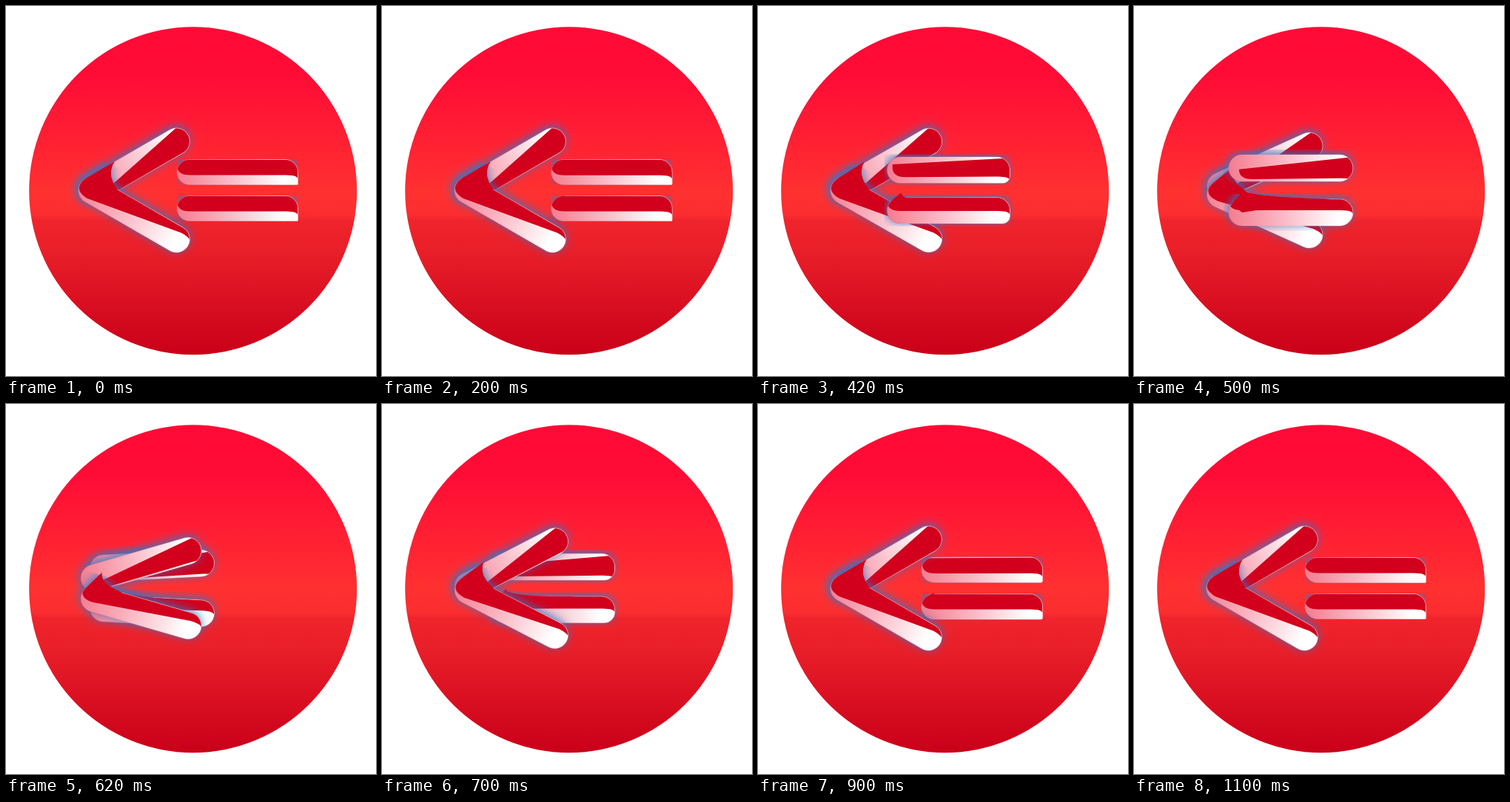
Write an HTML page with a canvas that moves like this. It is 500x500 px and loops after 1180 ms.

```html
<!DOCTYPE html>
<html>
<head>
<meta charset="utf-8">
<style>
html, body { margin: 0; width: 100%; height: 100%; overflow: hidden; background: #fff; }
canvas { display: block; }
</style>
</head>
<body>
<canvas id="stage" width="500" height="500"></canvas>
<script>
const ctx = document.getElementById('stage').getContext('2d');
const LOOP = 1180, START = 100, END = 1070, STEP = 20;
const MID_Y = 249, DARK = '#d2001c';
const SLIDE_END = .28, TURN_END = .89;

const clamp = x => Math.max(0, Math.min(1, x));
const ease = x => x < .5 ? 4 * x ** 3 : 1 - 4 * (1 - x) ** 3;
const smooth = x => x * x * (3 - 2 * x);

function gradient(x0, y0, x1, y1, stops) {
  const g = ctx.createLinearGradient(x0, y0, x1, y1);
  for (const [at, colour] of stops) g.addColorStop(at, colour);
  return g;
}

// A bar first slides left (j), then turns into an arm of the arrow head (k).
// side is -1 for the upper piece, 1 for the lower one.
function makePiece(s, side) {
  const j = clamp(s / SLIDE_END);
  const k = clamp((s - SLIDE_END) / (TURN_END - SLIDE_END));
  const turn = smooth(k);
  const piece = {
    s,
    r: 17 + clamp(s * 4),
    length: 129.5 + 2.5 * j,
    x: 248 - 102 * j ** .9 - 30 * (1 - (1 - k) ** 3),
    y: MID_Y + side * (24.5 + 5.5 * j - 30 * turn),
    angle: side * turn * Math.PI / 6
  };
  const { r, length } = piece;
  piece.body = new Path2D();
  piece.body.roundRect(-r, -r, length + 2 * r, 2 * r, [r, r, Math.min(r, 1 + s * 60), r]);
  piece.shape = new Path2D(piece.body);

  // Edges of the dark area as parts of the thickness.
  if (side < 0) {
    piece.dark = darkArea(piece, 14 * j,
      .55 * j + .33 * turn, .08 * j * (1 - k),
      .62 + .3 * j + .08 * k, .62 + .26 * j + .12 * k);
  } else {
    piece.dark = darkArea(piece, 0, 0, 0,
      .62 - .2 * j + .43 * turn, .62 - .2 * j - .22 * turn);
    piece.hook = makeHook(piece, j, k);
    piece.shape.addPath(piece.hook);
  }
  return piece;
}

function darkArea({ r, length }, inset, ...edges) {
  const [topL, topR, botL, botR] = edges.map(f => (2 * f - 1) * r);
  const left = inset - r, right = length + r;
  const shoulder = Math.max(topL, botL - 13);
  const path = new Path2D();
  path.moveTo(left, shoulder);
  path.lineTo(left, topL);
  path.lineTo(right, topR);
  path.lineTo(right, botR + 6);
  path.quadraticCurveTo(right, botR, right - 16, botR);
  path.lineTo(left + 18, botL);
  path.quadraticCurveTo(left, botL, left, shoulder);
  return path;
}

// The lower piece grows a tip that overlaps the start of the upper one.
function makeHook({ r, angle }, j, k) {
  const tipX = 3 * j + 28 * k * k, tipY = -17 - 14 * j - 8 * smooth(k);
  const foot = j * (30 + 90 * (1 - k) ** 4);
  const c = Math.cos(angle), n = Math.sin(angle);
  const local = (x, y) => [x * c + y * n, y * c - x * n];
  const tangent = Math.atan2(tipY, tipX) - Math.acos(Math.min(1, r / Math.hypot(tipX, tipY)));
  const path = new Path2D();
  path.moveTo(0, 0);
  path.lineTo(...local(r * Math.cos(tangent), r * Math.sin(tangent)));
  path.lineTo(...local(tipX, tipY));
  path.quadraticCurveTo(...local(tipX * .6, -21 * j), foot, -r);
  path.closePath();
  return path;
}

function drawGlow({ s, r, length, shape }) {
  const m = 25 * s;
  ctx.save();
  ctx.beginPath();
  ctx.rect(-r - m, -r - m, length + 2 * (r + m), 2 * (r + m));
  ctx.clip();
  ctx.shadowColor = '#2b78cc';
  ctx.shadowBlur = 13;
  ctx.shadowOffsetX = -1;
  ctx.shadowOffsetY = -2;
  ctx.fillStyle = DARK;
  ctx.fill(shape);
  ctx.restore();
}

function drawBody({ r, length, body, dark, hook }) {
  const shine = gradient(-r, 0, length + r, 0,
    [[0, '#f47c8f'], [.45, '#fabbc7'], [.88, '#fff']]);
  ctx.fillStyle = shine;
  ctx.fill(body);
  ctx.save();
  ctx.clip(body);
  ctx.fillStyle = DARK;
  ctx.fill(dark);
  ctx.restore();
  ctx.save();
  ctx.lineWidth = .8;
  ctx.globalAlpha = .5;
  ctx.strokeStyle = shine;
  ctx.stroke(body);
  ctx.restore();
  if (hook) {
    ctx.fillStyle = DARK;
    ctx.fill(hook);
  }
}

function drawPair(s) {
  for (const side of [-1, 1]) {
    const piece = makePiece(s, side);
    ctx.save();
    ctx.translate(piece.x, piece.y);
    ctx.rotate(piece.angle);
    drawGlow(piece);
    drawBody(piece);
    ctx.restore();
  }
}

const discFill = gradient(0, 28, 0, 471, [
  [0, '#ff0a36'], [.15, '#ff0c36'], [.5, '#ff3030'], [.575, '#fb2d2f'],
  [.59, '#ef242c'], [.68, '#e91f29'], [1, '#c90019']
]);

function draw(time) {
  const t = Math.floor(time % LOOP / STEP) * STEP;
  const k = clamp((t - START) / (END - START));
  ctx.fillStyle = '#fff';
  ctx.fillRect(0, 0, 500, 500);
  ctx.fillStyle = discFill;
  ctx.beginPath();
  ctx.arc(252.7, 249.7, 221.5, 0, 2 * Math.PI);
  ctx.fill();
  drawPair(ease(1 - k)); // head opening out into bars
  drawPair(ease(k));     // bars closing into the head
}

const begin = performance.now();
function tick() {
  draw(performance.now() - begin);
  requestAnimationFrame(tick);
}
tick();
</script>
</body>
</html>
```
